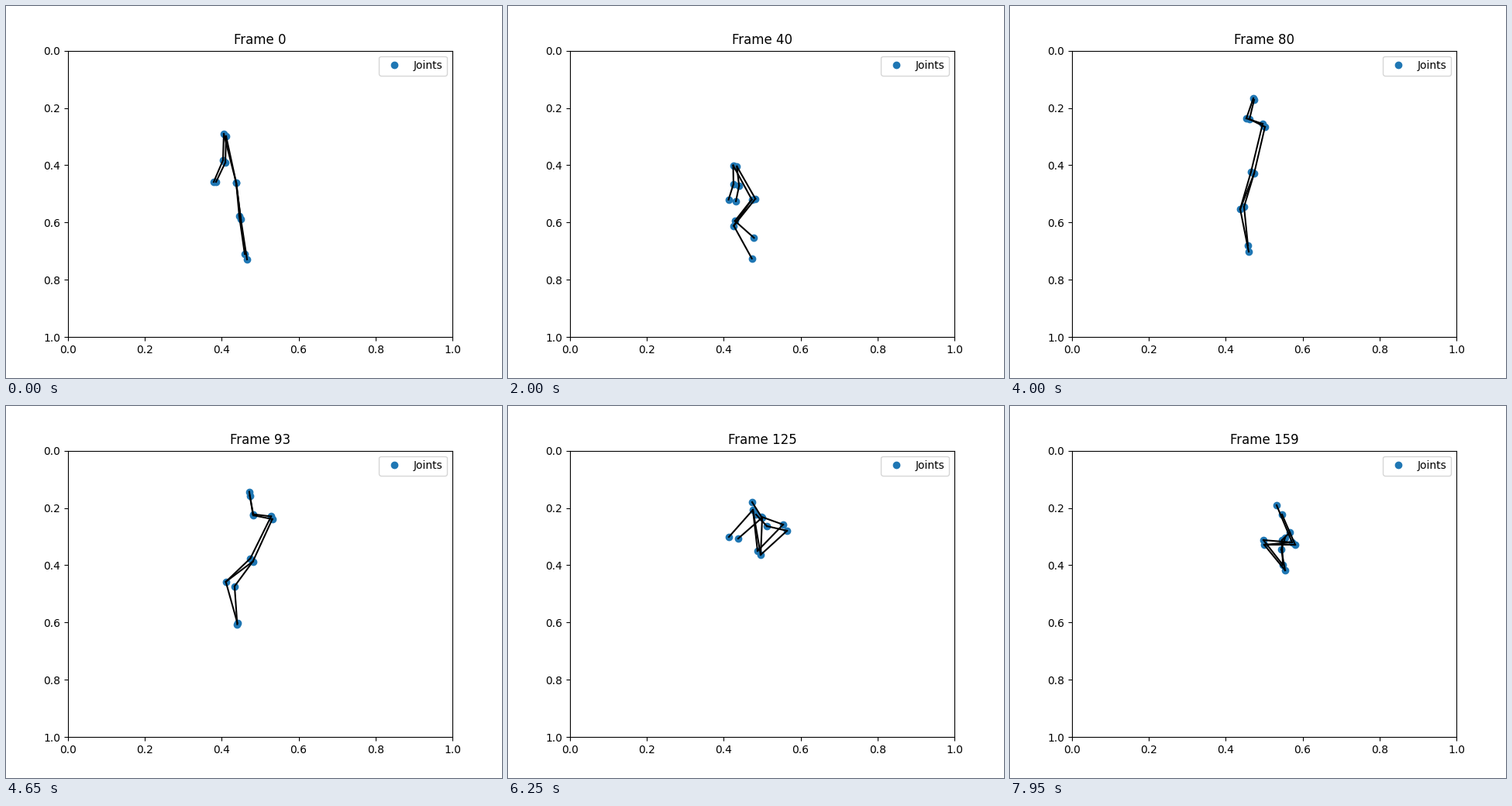
Write a matplotlib script that moves like this. It is 640x480 px and loops after 8000 ms.

```python
import numpy as np
import matplotlib.pyplot as plt
from matplotlib.animation import FuncAnimation

FRAMES = 160
INTERVAL = 50
KEYS = [0, 21, 58, 80, 105, 125, 159]

# Joint positions on the stage in pixels, one point per key time.
HIP_A = [(297, 228), (313, 242), (315, 253), (315, 216), (323, 193), (326, 192), (328, 179)]
HIP_B = [(297, 228), (321, 243), (316, 251), (311, 214), (320, 188), (322, 187), (327, 173)]

SHOULDER_A = [(281, 165), (286, 211), (306, 194), (329, 156), (355, 146), (360, 161), (355, 212)]
SHOULDER_B = [(284, 168), (295, 212), (304, 194), (326, 152), (352, 143), (355, 153), (352, 205)]

ELBOW_A = [(280, 199), (309, 215), (282, 200), (309, 146), (328, 147), (334, 155), (350, 185)]
ELBOW_B = [(283, 202), (319, 212), (278, 199), (305, 145), (326, 144), (327, 143), (351, 173)]

WRIST_A = [(268, 227), (328, 223), (264, 187), (315, 121), (313, 126), (320, 140), (355, 170)]
WRIST_B = [(271, 227), (338, 216), (261, 185), (314, 119), (309, 119), (315, 124), (361, 163)]

KNEE_A = [(301, 271), (290, 277), (296, 276), (302, 259), (289, 203), (328, 144), (368, 179)]
KNEE_B = [(303, 275), (294, 280), (288, 285), (297, 262), (282, 185), (316, 134), (364, 176)]

ANKLE_A = [(308, 320), (308, 306), (323, 294), (307, 309), (291, 250), (297, 171), (351, 140)]
ANKLE_B = [(311, 327), (316, 321), (313, 330), (308, 317), (300, 236), (285, 169), (344, 128)]

# Extra bone directions (degrees) between the key times.
UPPER_ARM = {52: 150, 68: 200}
FOREARM = {52: 185, 68: 265}
SHIN = {115: 95}


def ease(keys, values):
    """Monotone cubic curve through the keys, sampled at every frame."""
    x, y = np.asarray(keys, float), np.asarray(values, float)
    h = np.diff(x)
    d = np.diff(y) / h
    m = np.concatenate([d[:1], np.zeros(len(x) - 2), d[-1:]])
    for i in range(1, len(x) - 1):
        if d[i - 1] * d[i] > 0:
            w1, w2 = 2 * h[i] + h[i - 1], h[i] + 2 * h[i - 1]
            m[i] = (w1 + w2) / (w1 / d[i - 1] + w2 / d[i])
    t = np.arange(FRAMES)
    k = np.clip(np.searchsorted(x, t, side="right") - 1, 0, len(h) - 1)
    s = (t - x[k]) / h[k]
    return ((1 + 2 * s) * (1 - s) ** 2 * y[k] + s * (1 - s) ** 2 * h[k] * m[k]
            + s * s * (3 - 2 * s) * y[k + 1] + s * s * (s - 1) * h[k] * m[k + 1])


def root(points, mid_x):
    """Path of a hip, with its x position pulled to mid_x during the tuck."""
    px, py = np.array(points, float).T
    x = ease(KEYS[:-1] + [142, KEYS[-1]], np.insert(px, -1, mid_x))
    return np.stack([x, ease(KEYS, py)], axis=1)


def bone(path, start, end, extra=None):
    """Swing a bone from a moving joint by easing its angle and length."""
    dx, dy = (np.array(end, float) - np.array(start, float)).T
    angles = dict(zip(KEYS, np.degrees(np.arctan2(dy, dx))))
    angles.update(extra or {})
    times = sorted(angles)
    turn = np.unwrap([angles[t] for t in times], period=360)
    a = np.radians(ease(times, turn))
    r = ease(KEYS, np.hypot(dx, dy))
    return path + np.stack([r * np.cos(a), r * np.sin(a)], axis=1)


def body_side(hip, shoulder, elbow, wrist, knee, ankle, mid_x):
    h = root(hip, mid_x)
    s = bone(h, hip, shoulder)
    e = bone(s, shoulder, elbow, UPPER_ARM)
    w = bone(e, elbow, wrist, FOREARM)
    k = bone(h, hip, knee)
    f = bone(k, knee, ankle, SHIN)
    return [s, e, w, h, k, f]


side_a = body_side(HIP_A, SHOULDER_A, ELBOW_A, WRIST_A, KNEE_A, ANKLE_A, 322)
side_b = body_side(HIP_B, SHOULDER_B, ELBOW_B, WRIST_B, KNEE_B, ANKLE_B, 320)

# Stage pixels to axes data; indexed [frame, joint, xy].
joints = np.stack(side_a + side_b, axis=1)
joints = (joints - [80, 57.6]) / [496, 369.6]

LIMBS = [(0, 1), (1, 2), (0, 3), (3, 4), (4, 5)]
LINKS = LIMBS + [(i + 6, j + 6) for i, j in LIMBS] + [(3, 10)]

fig, ax = plt.subplots(figsize=(6.4, 4.8), dpi=100)
ax.set_xlim(0, 1)
ax.set_ylim(1, 0)
dots, = ax.plot([], [], "o", label="Joints")
bones = [ax.plot([], [], "k-")[0] for _ in LINKS]
ax.legend(loc="upper right")
title = ax.set_title("Frame 0")


def update(frame):
    pose = joints[frame]
    dots.set_data(pose[:, 0], pose[:, 1])
    for line, link in zip(bones, LINKS):
        ends = pose[list(link)]
        line.set_data(ends[:, 0], ends[:, 1])
    title.set_text(f"Frame {frame}")
    return [dots, *bones, title]


anim = FuncAnimation(fig, update, frames=FRAMES, interval=INTERVAL,
                     repeat=True, repeat_delay=0, blit=False)
plt.show()
```
